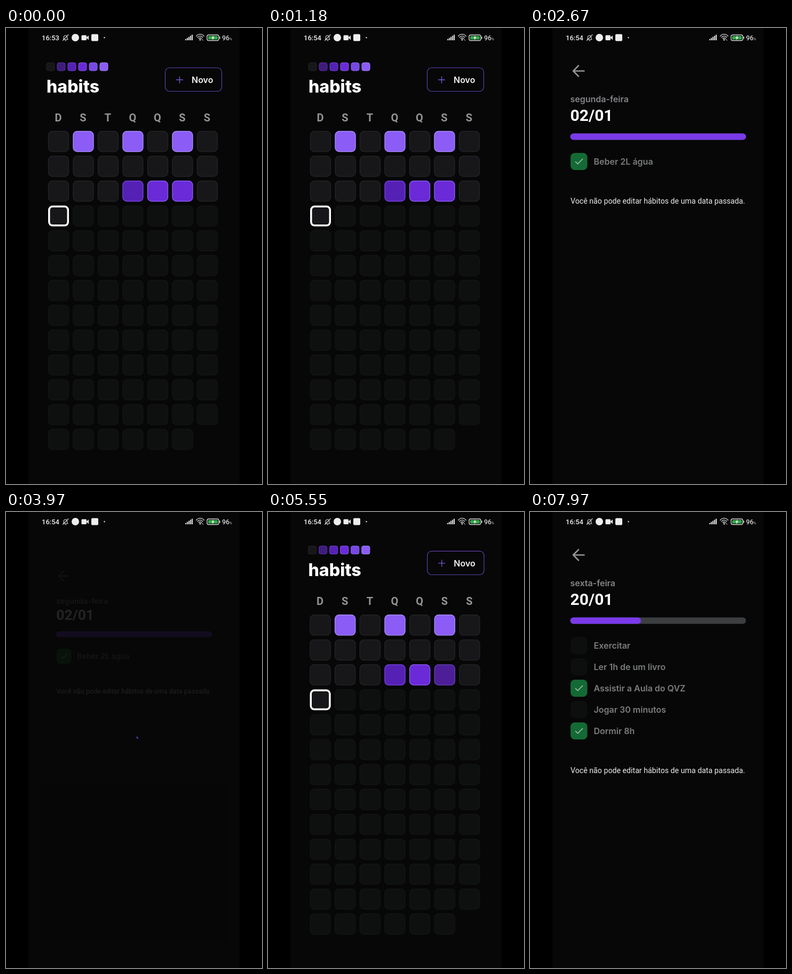
These frames come from a looping animation (480x854 px, 8 s). An HTML page:

```html
<!DOCTYPE html>
<html lang="pt">
<head>
<meta charset="utf-8">
<title>Habits</title>
<style>
html, body { margin: 0; width: 100%; height: 100%; overflow: hidden; background: #000; }
svg { display: block; width: 100%; height: 100%; }
.inter { font-family: Inter, sans-serif; font-weight: 600; font-size: 16px; }
.roboto { font-family: Roboto, sans-serif; }
</style>
</head>
<body>
<svg id="stage" viewBox="0 0 480 854">
  <rect x="42" width="396" height="854" fill="#060706"/>
  <g id="home"></g>
  <g id="day"></g>
  <g id="status"></g>
</svg>
<script>
const LOOP = 8000;
const NS = 'http://www.w3.org/2000/svg';
const $ = id => document.getElementById(id);

function add(parent, tag, attrs = {}, text) {
  const node = document.createElementNS(NS, tag);
  for (const key in attrs) node.setAttribute(key, attrs[key]);
  if (text !== undefined) node.textContent = text;
  parent.appendChild(node);
  return node;
}
const group = parent => add(parent, 'g');
const label = (parent, x, y, text, cls, attrs) => add(parent, 'text', { x, y, class: cls, ...attrs }, text);
const box = (parent, x, y, w, h, rx, fill, attrs) =>
  add(parent, 'rect', { x, y, width: w, height: h, rx, fill, ...attrs });
const line = (parent, d, stroke, width, attrs) => add(parent, 'path', {
  d, stroke, 'stroke-width': width, fill: 'none', 'stroke-linecap': 'round', 'stroke-linejoin': 'round', ...attrs });

const clamp = v => Math.max(0, Math.min(1, v));
const ramp = (t, from, span) => clamp((t - from) / span);
const settle = p => 1 - (1 - p) ** 5;
const show = (node, on) => node.setAttribute('display', on ? 'inline' : 'none');
const fade = (node, v) => node.setAttribute('opacity', v);
const zoom = (node, s) =>
  node.setAttribute('transform', `translate(240 427) scale(${s}) translate(-240 -427)`);

// fill and border of each progress level
const LEVELS = [
  ['#171719', '#232326'], ['#3f1c7c', '#5a2cae'], ['#5521b5', '#7440e0'],
  ['#6a2ad8', '#8858f0'], ['#7848e4', '#8b62f0'], ['#8b5cf6', '#a58af8']
];

function buildStatus() {
  const g = $('status'), ink = '#d6d6d6', bright = '#eeeeee';
  const clock = label(g, 67, 22.5, '', 'roboto', { fill: bright, 'font-size': 13, 'font-weight': 500 });
  line(g, 'M107.500 21.500h8.500l-1.300-2v-3a3.300 3.300 0 0 0-6.400 0v3zM110.500 23.500h2.500M106.500 23.500l10.500-11', ink, 1.1);
  add(g, 'circle', { cx: 130, cy: 18, r: 7, fill: bright });
  box(g, 141.5, 13.5, 9.5, 9.5, 1.5, bright);
  add(g, 'path', { d: 'M150.500 18l4.500-4v8.500z', fill: bright });
  box(g, 160, 11.5, 13, 13, 2, bright);
  add(g, 'circle', { cx: 184.5, cy: 18, r: 1.3, fill: ink });
  for (let i = 0; i < 5; i++) box(g, 336 + i * 3, 20.5 - i * 2, 2.2, 2.5 + i * 2, .5, ink);
  for (const r of [9, 6, 3])
    line(g, `M${364 - r * .8} ${22 - r * .75}a${r} ${r} 0 0 1 ${r * 1.6} 0`, ink, 1.4);
  add(g, 'circle', { cx: 364, cy: 22, r: 1.6, fill: ink });
  line(g, 'M367.500 20.500l2 3', ink, 1);
  box(g, 377, 13, 22, 10.5, 3, 'none', { stroke: ink, 'stroke-width': 1.4 });
  box(g, 379, 15, 18, 6.5, 1.5, '#35a84c');
  box(g, 400, 16, 1.5, 4.5, .7, ink);
  add(g, 'path', { d: 'M389 14l-4 5h2.600l-1 4 4.400-5.500h-2.600z', fill: bright });
  label(g, 405, 22.5, '96', 'roboto', { fill: ink, 'font-size': 12.5, 'font-weight': 500 });
  label(g, 419, 22.5, '%', 'roboto', { fill: ink, 'font-size': 6.5 });
  return clock;
}

function buildHome() {
  const root = $('home'), page = group(root);
  LEVELS.forEach(([fill, stroke], i) =>
    box(page, 76 + i * 20, 65, 15, 15, 3.5, fill, { stroke }));
  label(page, 76, 121, 'habits', 'inter', { fill: '#fff', style: 'font-size:32px;font-weight:800' });
  box(page, 298.5, 74.5, 106, 44, 8, 'none', { stroke: '#5f40ad', 'stroke-width': 1.2 });
  line(page, 'M319.500 97h12M325.500 91v12', '#7a53d6', 1.4);
  label(page, 348, 103, 'Novo', 'inter', { fill: '#f4f4f4' });
  [...'DSTQQSS'].forEach((day, i) => label(page, 98 + i * 46.5, 175, day, 'roboto', {
    fill: '#949499', 'font-size': 20, 'font-weight': 700, 'text-anchor': 'middle' }));

  const today = 21, done = { 1: 5, 3: 5, 5: 5, 17: 2, 18: 3, 19: 3 };
  const cells = [];
  for (let i = 0; i < 90; i++) {
    const x = 79.5 + i % 7 * 46.5, y = 193.5 + Math.floor(i / 7) * 46.5;
    const [fill, stroke] = i > today ? ['#0e0f0f', '#131414'] : LEVELS[done[i] || 0];
    cells.push(i === today
      ? box(page, x + 1.3, y + 1.3, 35.5, 35.5, 6.5, fill, { stroke: '#fff', 'stroke-width': 3.5 })
      : box(page, x, y, 38, 38, 7.5, fill, { stroke, 'stroke-width': 1.4 }));
  }
  return { root, page, cells, spin: buildSpinner(root) };
}

function buildSpinner(parent) {
  return add(parent, 'circle', { cx: 240, cy: 427, r: 7.3, fill: 'none', stroke: '#7c3aed', 'stroke-width': 2 });
}

// circular arc that grows, then shrinks, while turning
function turnSpinner(node, age) {
  const p = age / 1333 % 1;
  const ease = v => v * v * (3 - 2 * v);
  const head = ease(clamp(p * 2)) * .75 + .04, tail = ease(clamp(p * 2 - 1)) * .75;
  const girth = 2 * Math.PI * 7.3;
  node.setAttribute('stroke-dasharray', `${(head - tail) * girth} ${girth}`);
  node.setAttribute('transform', `rotate(${-75 + age * .2 + tail * 360} 240 427)`);
}

function buildDay() {
  const root = $('day');
  box(root, 42, 0, 396, 854, 0, '#060706');
  const arrow = line(root, 'M101.500 80.500h-20M91 70.500l-10 10 10 10', '#939598', 2.5);
  return { root, arrow, spin: buildSpinner(root) };
}

function buildDetails(weekday, date, share, habits) {
  const g = group(day.root);
  label(g, 75.5, 139, weekday, 'inter', { fill: '#85858a' });
  label(g, 75.5, 173.5, date, 'roboto', { fill: '#fff', 'font-size': 30, 'font-weight': 700 });
  box(g, 75.5, 197.5, 329.5, 12, 6, '#3c3e40');
  const bar = box(g, 75.5, 197.5, 0, 12, 6, '#7a3aea');
  habits.forEach(([name, done], i) => {
    const y = 234 + i * 40;
    box(g, 76, y, 31.5, 32, 8, done ? '#146a34' : '#0d0f0e');
    if (done) line(g, `M85.500 ${y + 16.5}l4 4 9-9`, '#a5bdab', 1.7);
    label(g, 119.5, y + 22, name, 'inter', { fill: '#7c7d7e' });
  });
  label(g, 76, 289 + habits.length * 40, 'Você não pode editar hábitos de uma data passada.', 'roboto', {
    fill: '#ececec', 'font-size': 14.2 });
  return { g, bar, share };
}

const clock = buildStatus();
const home = buildHome();
const day = buildDay();
const visits = [
  { cell: 1, press: 1945, hold: 5, open: 2050, load: 2330, close: 3860, back: 4250,
    ...buildDetails('segunda-feira', '02/01', 1, [['Beber 2L água', true]]) },
  { cell: 19, press: 5440, hold: 100, open: 5549, load: 5870, close: Infinity, back: Infinity,
    ...buildDetails('sexta-feira', '20/01', .402, [
      ['Exercitar', false], ['Ler 1h de um livro', false], ['Assistir a Aula do QVZ', true],
      ['Jogar 30 minutos', false], ['Dormir 8h', true]]) }
];

function render(t) {
  clock.textContent = t < 30 ? '16:53' : '16:54';

  let homeScale = 1, dayScale = 1, dayAlpha = 0, loading = false;
  for (const v of visits) {
    const pressed = t < v.close ? ramp(t, v.press, v.hold) : 0;
    fade(home.cells[v.cell], 1 - .3 * pressed);
    const active = t >= v.open && t < v.close + 450;
    const loaded = active && t >= v.load;
    show(v.g, loaded);
    v.bar.setAttribute('width', 329.5 * v.share * (1 - (1 - ramp(t, v.load, 300)) ** 3));
    if (active) {
      show(day.spin, !loaded);
      turnSpinner(day.spin, t - v.open);
      const enter = settle(ramp(t, v.open, 450)), leave = settle(ramp(t, v.close, 450));
      homeScale = t < v.close ? 1 + .15 * enter : 1.15 - .15 * leave;
      dayScale = .85 + .15 * enter - .15 * leave;
      dayAlpha = ramp(t, v.open + 50, 83) * (1 - ramp(t, v.close + 37, 83));
      fade(day.arrow, 1 - .3 * ramp(t, v.close - 150, 120));
    }
    if (t >= v.close && t < v.back) {
      loading = true;
      turnSpinner(home.spin, t - v.close);
    }
  }
  show(home.page, !loading);
  show(home.spin, loading);
  zoom(home.root, homeScale);
  zoom(day.root, dayScale);
  fade(day.root, dayAlpha);
  show(day.root, dayAlpha > 0);
}

function tick() {
  render(performance.now() % LOOP);
  requestAnimationFrame(tick);
}
tick();
</script>
</body>
</html>
```
